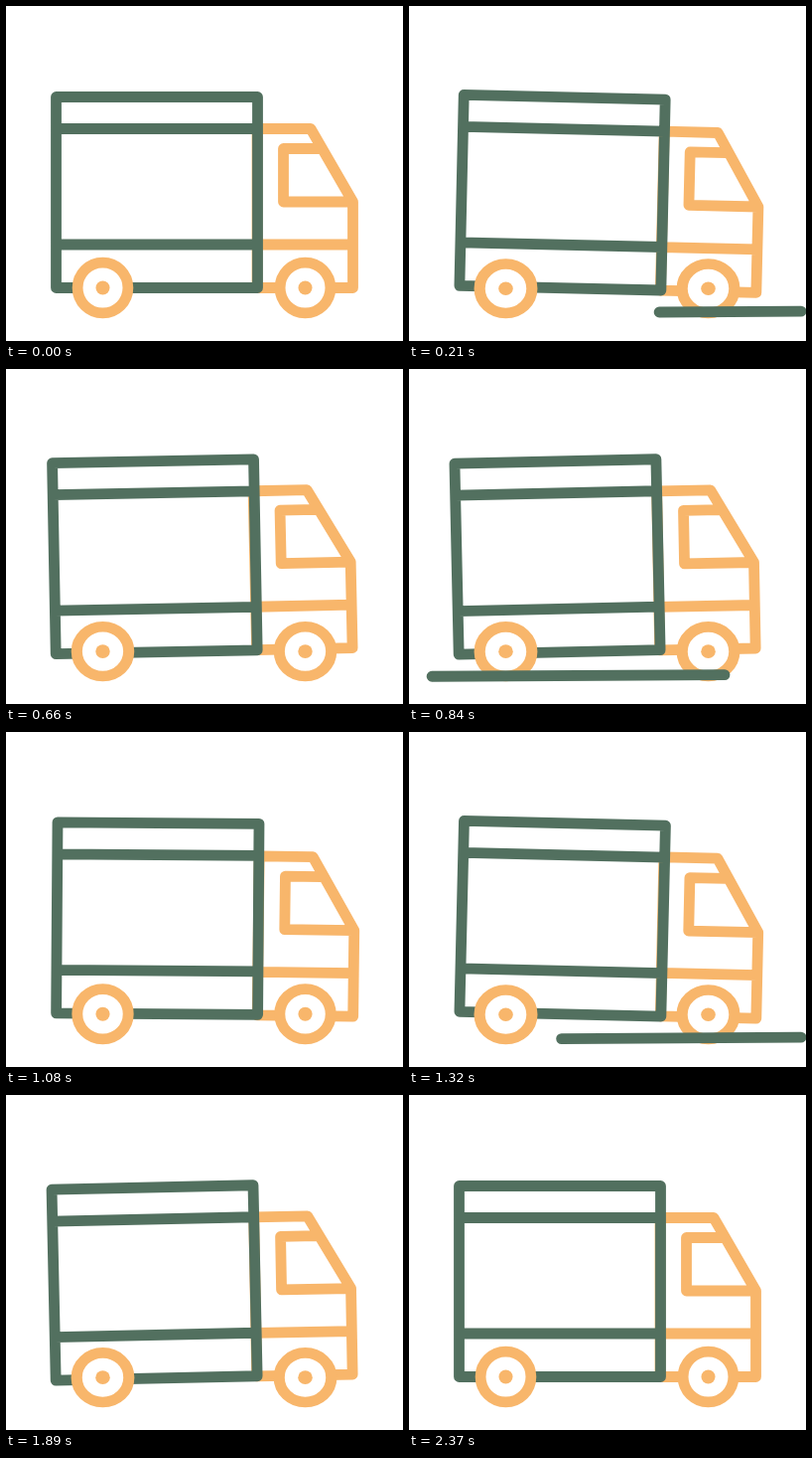
An HTML page that plays this animation: 400 px wide and 337 px high, repeating every 4.46 s.

```html
<!DOCTYPE html>
<html lang="en">
<head>
<meta charset="utf-8">
<title>Delivery truck</title>
<style>
  html, body { margin: 0; height: 100%; overflow: hidden; background: #fff; }
  svg { display: block; width: 100%; height: 100%; }
  path, line { fill: none; stroke-width: 10.8; stroke-linecap: round; stroke-linejoin: round; }
  .green { stroke: #52705f; }
  .orange { stroke: #f8b66b; }
  .tyre { fill: #fff; stroke: #f8b66b; stroke-width: 10.8; }
  .hub { fill: #f8b66b; }
</style>
</head>
<body>
<svg viewBox="0 0 400 337">
  <defs>
    <g id="wheel">
      <circle class="tyre" cy="-30.5" r="25.4"/>
      <circle class="hub" cy="-30.5" r="7"/>
    </g>
  </defs>
  <path id="cab" class="orange" d="M253 123.5H307L349.5 197V283.5H253ZM316 143.5H279.5V197H349.5M253 240H349.5"/>
  <path id="box" class="green" d="M50.5 91.5H253.5V283.5H50.5ZM50.5 123.5H253.5M50.5 240H253.5"/>
  <use class="wheel" href="#wheel" data-x="97.5"/>
  <use class="wheel" href="#wheel" data-x="301.5"/>
  <line id="road" class="green"/>
</svg>
<script>
const LOOP = 4460, STEP = 30, TILT = 1.38;
const cab = document.getElementById('cab');
const box = document.getElementById('box');
const road = document.getElementById('road');
const wheels = document.querySelectorAll('.wheel');

// Rocking keys: time in ms, share of full tilt
const ROCK = [[0, 0], [250, 1], [770, -1], [1290, 1], [1810, -1], [2170, -.08], [2370, 0]];
// Road dash: first pass, time between passes, travel time, delay of its rear end
const PASS = { start: 128, every: 538, travel: 200, lag: 117, count: 3 };

const clamp = u => Math.min(1, Math.max(0, u));
const smooth = u => { u = clamp(u); return u * u * (3 - 2 * u); };

function rock(t) {
  for (let i = 1; i < ROCK.length; i++) {
    const [t0, a] = ROCK[i - 1], [t1, b] = ROCK[i];
    if (t < t1) return a + (b - a) * (1 - Math.cos(Math.PI * (t - t0) / (t1 - t0))) / 2;
  }
  return 0;
}

function tilt(el, k) {
  el.setAttribute('transform', `translate(0 ${.9 * Math.abs(k)}) rotate(${TILT * k} 180 300)`);
}

function drawRoad(t) {
  const n = Math.floor((t - PASS.start) / PASS.every);
  const p = t - PASS.start - n * PASS.every;
  const shown = n >= 0 && n < PASS.count && p > 0 && p < PASS.travel + PASS.lag;
  road.style.display = shown ? '' : 'none';
  if (!shown) return;
  [p, p - PASS.lag].forEach((time, i) => {
    const x = 395 - 390 * smooth(time / PASS.travel);
    road.setAttribute('x' + (i + 1), x);
    road.setAttribute('y' + (i + 1), 309.4 - .0056 * x);
  });
}

function draw(t) {
  const k = rock(t), squash = Math.abs(k);
  tilt(box, k);
  tilt(cab, rock(t + 40 * clamp(t / 300)));  // the cab leads slightly
  for (const w of wheels) {
    w.setAttribute('transform',
      `translate(${w.dataset.x} 314) scale(${1 + .04 * squash} ${1 - .025 * squash})`);
  }
  drawRoad(t);
}

const begin = performance.now();
function tick() {
  const t = (performance.now() - begin) % LOOP;
  draw(Math.floor(t / STEP) * STEP);
  requestAnimationFrame(tick);
}
draw(0);
requestAnimationFrame(tick);
</script>
</body>
</html>
```
